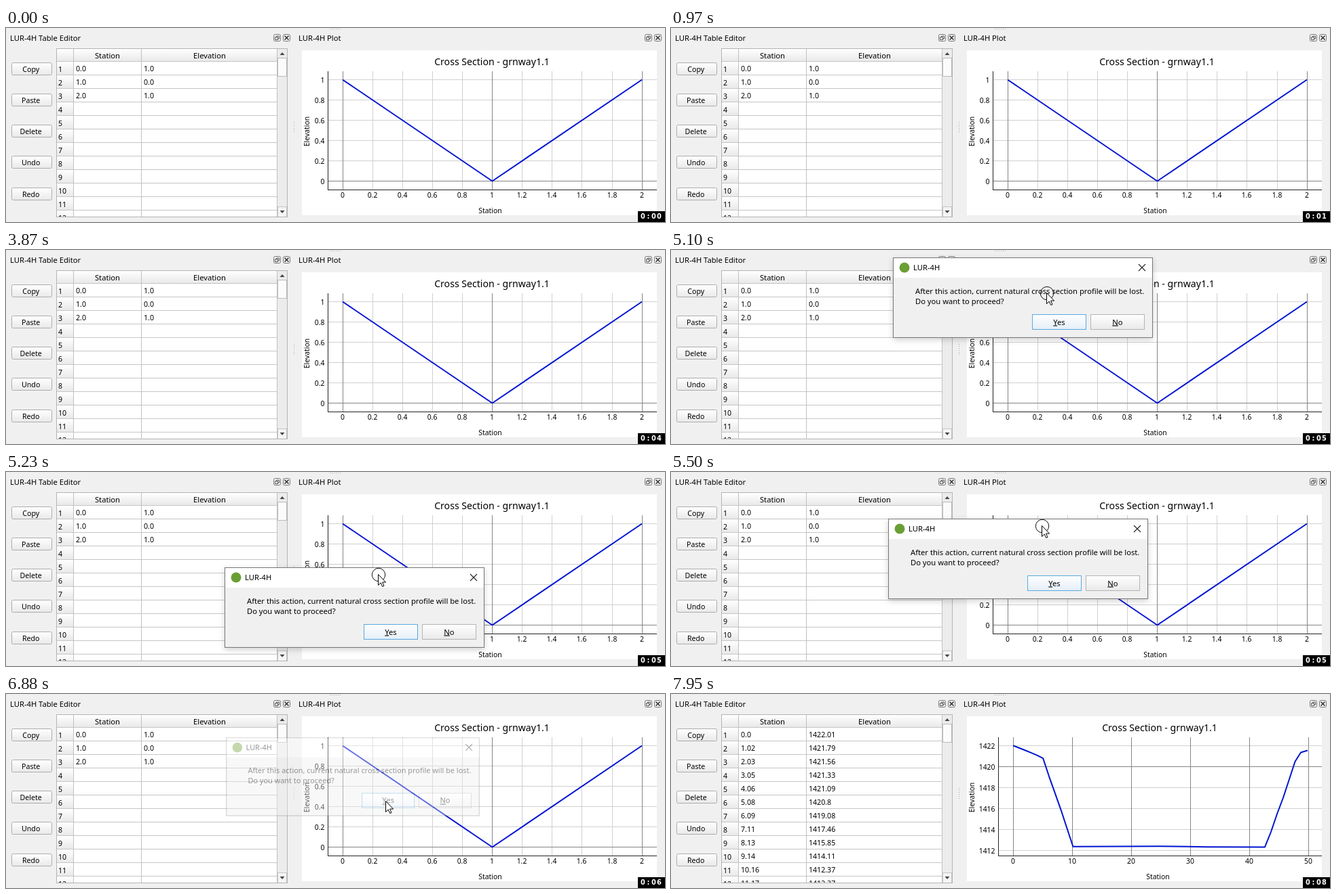
An HTML page that plays this animation: 971 by 287 pixels, repeating every 8 s.

```html
<!DOCTYPE html>
<html lang="en">
<head>
<meta charset="utf-8">
<title>Cross section editor</title>
<style>
  html, body { margin: 0; width: 100%; height: 100%; overflow: hidden; background: #f0f0f0; }
  svg { display: block; }
  text { font-family: "Noto Sans", "Open Sans", sans-serif; font-size: 10.6px; fill: #000; white-space: pre; }
  .ui { font-size: 11.2px; }
  .plot text { font-size: 10.4px; }
  .plot .title { font-size: 14.1px; }
  .clock { font: bold 9.8px "DejaVu Sans", sans-serif; fill: #fff; }
  .crisp { shape-rendering: crispEdges; }
</style>
</head>
<body>
<svg id="stage" width="971" height="287" viewBox="0 0 971 287">
  <defs>
    <linearGradient id="face" x2="0" y2="1">
      <stop offset="0" stop-color="#fff"/><stop offset="1" stop-color="#e9e9e9"/>
    </linearGradient>
    <linearGradient id="focus" x2="0" y2="1">
      <stop offset="0" stop-color="#fff"/><stop offset="1" stop-color="#e4eef8"/>
    </linearGradient>
    <filter id="shadow" x="-10%" y="-20%" width="120%" height="150%">
      <feDropShadow dx="0" dy="3" stdDeviation="4" flood-opacity=".18"/>
    </filter>
    <clipPath id="tableClip"><rect x="75" y="31" width="339" height="248"/></clipPath>
  </defs>
</svg>
<script>
const DURATION = 8000;
const APP = 'LUR-4H';
const stage = document.getElementById('stage');

const rect = (x, y, w, h, fill, stroke = 'none', extra = '') =>
  `<rect x="${x}" y="${y}" width="${w}" height="${h}" fill="${fill}" stroke="${stroke}" ${extra}/>`;
const line = (x1, y1, x2, y2, stroke) =>
  `<path class="crisp" d="M${x1} ${y1}L${x2} ${y2}" stroke="${stroke}"/>`;
const label = (x, y, str, extra = '') => `<text x="${x}" y="${y}" ${extra}>${str}</text>`;
const centered = (x, y, str, extra = '') => label(x, y, str, `text-anchor="middle" ${extra}`);
const group = (content, extra = '') => `<g ${extra}>${content}</g>`;
const range = n => [...Array(n).keys()];

function dockButtons(x) {
  const box = dx => rect(x + dx + .5, 9.5, 10, 10, '#f4f4f4', '#777', 'rx="2"');
  return box(0) + box(14) +
    `<path d="M${x + 4.5} 14V12h4v4h-2M${x + 2.5} 13.5h4v4h-4z" fill="none" stroke="#555"/>` +
    `<path d="M${x + 16.5} 11.5l6 6m0-6l-6 6" stroke="#333" stroke-width="1.6"/>`;
}

function toolButton(name, i) {
  const y = 51 + Math.floor(i * 46.25);
  return rect(8.5, y + .5, 59, 18, 'url(#face)', '#adadad', 'rx="2"') + centered(36.7, y + 14, name);
}

function table(rows) {
  const header = rect(75, 31, 325, 18, 'url(#face)') +
    centered(149.5, 45, 'Station', 'class="ui"') + centered(300, 45, 'Elevation', 'class="ui"');
  const body = range(12).map(i => {
    const y = 49 + 20 * i;
    const [station = '', elevation = ''] = rows[i] || [];
    return rect(75, y + 1, 24, 19, 'url(#face)') + label(77, y + 15.5, i + 1) +
      label(103, y + 15, station) + label(203, y + 15, elevation) +
      line(75, y + .5, 400, y + .5, '#c6c6c6');
  }).join('');
  const columns = [99.5, 199.5, 399.5].map(x => line(x, 31, x, 280, '#c0c0c0')).join('');
  const scroll = rect(400, 31, 14, 248, '#ececec') +
    rect(400.5, 44.5, 13, 27, '#fbfbfb', '#bbb') +
    rect(400.5, 264.5, 13, 15, '#f5f5f5', '#c4c4c4') +
    '<path d="M403.5 40h7l-3.5-4zM403.5 270h7l-3.5 4z" fill="#444"/>';
  return rect(74.5, 30.5, 340, 249, '#fff', '#b4b4b4') +
    group(header + body + columns + scroll, 'clip-path="url(#tableClip)"');
}

// Each tick: { at, text, dark }
function plot({ left, middle, stationX, xTicks, yTicks, curve }) {
  const shade = tick => tick.dark ? '#858585' : '#d0d0d0';
  const byShade = (a, b) => !!a.dark - !!b.dark;
  const grid = [
    ...yTicks.map(t => ({ dark: t.dark, svg: line(left, t.at, 959, t.at, shade(t)) })),
    ...xTicks.map(t => ({ dark: t.dark, svg: line(t.at, 64, t.at, 239, shade(t)) })),
  ].sort(byShade).map(g => g.svg).join('');
  return grid +
    `<path class="crisp" d="M${left} 64V239.5H959" fill="none" stroke="#222"/>` +
    yTicks.map(t => label(left - 5, t.at + 4, t.text, 'text-anchor="end"')).join('') +
    xTicks.map(t => centered(t.at - .5, 250.5, t.text)).join('') +
    centered(middle, 55, 'Cross Section - grnway1.1', 'class="title"') +
    centered(stationX, 274, 'Station') +
    centered(0, 0, 'Elevation', 'transform="translate(447 153) rotate(-90)"') +
    `<polyline points="${curve}" fill="none" stroke="#0014d2" stroke-width="2" stroke-linejoin="round"/>`;
}

const tidy = v => String(+v.toFixed(1));
const before = table([['0.0', '1.0'], ['1.0', '0.0'], ['2.0', '1.0']]) + group(plot({
  left: 474.5, middle: 716, stationX: 713.5,
  xTicks: range(11).map(i => ({ at: Math.floor(496.15 + 44.1 * i) + .5, text: tidy(i / 5), dark: i % 5 === 0 })),
  yTicks: range(6).map(i => ({ at: 226.5 - 30 * i, text: tidy(i / 5), dark: i === 0 })),
  curve: '496,76.5 716.5,226.5 937,76.5',
}), 'class="plot"');

const stations = ['0.0', 1.02, 2.03, 3.05, 4.06, 5.08, 6.09, 7.11, 8.13, 9.14, 10.16, 11.17];
const elevations = [1422.01, 1421.79, 1421.56, 1421.33, 1421.09, 1420.8,
  1419.08, 1417.46, 1415.85, 1414.11, 1412.37, 1412.37];
const bank = stations.slice(0, 11).map((s, i) =>
  `${(504 + 8.7 * s).toFixed(1)},${(76.5 + (1422 - elevations[i]) * 15.5).toFixed(1)}`).join(' ');
const after = table(stations.map((s, i) => [s, elevations[i]])) + group(plot({
  left: 482.5, middle: 720, stationX: 717.5,
  xTicks: range(6).map(i => ({ at: 504.5 + 87 * i, text: i * 10, dark: true })),
  yTicks: range(6).map(i => ({ at: 231.5 - 31 * i, text: 1412 + 2 * i, dark: i === 4 })),
  curve: bank + ' 660,225.5 720,225.2 790,226.2 875,226.4 884,204 893,177.5 902,153.5 911,126 919.5,100 928,86.5 938,83.5',
}), 'class="plot"');

function dialogButton(x, key, rest, fill, stroke, id) {
  return rect(x + .5, 84.5, 79, 22, fill, stroke, `id="${id}"`) +
    centered(x + 40, 99.5, `<tspan text-decoration="underline">${key}</tspan>${rest}`, 'class="ui"');
}

const dialog = rect(.5, .5, 382, 118, '#f0f0f0', '#777', 'id="frame" filter="url(#shadow)"') +
  rect(1, 1, 381, 29, '#fff') +
  '<circle cx="17" cy="15" r="7.5" fill="#6a9f35"/>' +
  label(30, 19, APP, 'class="ui"') +
  '<path d="M362 10l10 10m0-10l-10 10" stroke="#222" stroke-width="1.1"/>' +
  label(33, 54, 'After this action, current natural cross section profile will be lost.', 'class="ui"') +
  label(33, 69, 'Do you want to proceed?', 'class="ui"') +
  dialogButton(205, 'Y', 'es', 'url(#focus)', '#5aa9e0', 'yes') +
  dialogButton(291, 'N', 'o', 'url(#face)', '#b4b4b4', 'no');

const dots = range(6).map(i => rect(424, 139 + 3 * i, 1, 1, '#aaa') + rect(477 + 3 * i, 1, 1, 1, '#aaa')).join('');

stage.insertAdjacentHTML('beforeend',
  rect(0, 0, 971, 287, '#f0f0f0') +
  label(6, 19, `${APP} Table Editor`, 'class="ui"') + label(431, 19, `${APP} Plot`, 'class="ui"') +
  dockButtons(394) + dockButtons(941) + dots +
  ['Copy', 'Paste', 'Delete', 'Undo', 'Redo'].map(toolButton).join('') +
  rect(436, 33, 523, 244, '#fff') +
  group(before, 'id="before"') + group(after, 'id="after"') +
  group(dialog, 'id="dialog"') +
  '<g id="cursor"><circle id="ring" cx="1" cy="1" r="9.7" fill="none" stroke="#111"/>' +
  '<path d="M.5 .5V16.5L4.2 13L6.7 18.5L9 17.5L6.6 12.1H11.6Z" fill="#fff" stroke="#000"/></g>' +
  rect(931, 271, 40, 16, '#000') + '<text id="clock" class="clock" x="935 944.5 951 959" y="282.2"></text>');

const part = Object.fromEntries(['before', 'after', 'dialog', 'frame', 'yes', 'cursor', 'ring', 'clock']
  .map(id => [id, document.getElementById(id)]));

const clockTicks = [970, 1980, 2860, 3870, 4960, 6030, 7000, 7950];
const dialogSteps = [[5100, 327, 11], [5230, 322, 141], [5370, 320, 97], [5500, 320, 69], [5650, 320, 63]];
const cursorSteps = [[5100, 553, 63], [5230, 548, 151], [5370, 546, 107], [5500, 546, 79], [5650, 546, 73],
  [5800, 545, 78], [5910, 543, 108], [6030, 541, 142], [6180, 559, 164], [6320, 559, 158], [7420, 881, 104]];

const stepAt = (steps, t) => steps.filter(s => s[0] <= t).pop();
const show = (el, on) => el.setAttribute('visibility', on ? 'visible' : 'hidden');

function render(t) {
  const updated = t >= 7000;
  part.before.style.display = updated ? 'none' : '';
  part.after.style.display = updated ? '' : 'none';
  part.clock.textContent = '0:0' + clockTicks.filter(c => c <= t).length;

  const box = stepAt(dialogSteps, t);
  const fading = t >= 6880;
  part.dialog.style.display = box && !updated ? '' : 'none';
  if (box) {
    const shrink = fading ? ' translate(191 59) scale(.975) translate(-191.5 -59)' : '';
    part.dialog.setAttribute('transform', `translate(${box[1]} ${box[2]})${shrink}`);
    part.dialog.setAttribute('opacity', fading ? .4 : 1);
    part.frame.setAttribute('filter', fading ? 'none' : 'url(#shadow)');
    part.yes.setAttribute('fill', t >= 6730 && !fading ? '#cce4f7' : 'url(#focus)');
  }

  const tip = stepAt(cursorSteps, t);
  const visible = tip && t < 7570;
  show(part.cursor, visible);
  show(part.ring, visible && t < 5800);
  if (tip) part.cursor.setAttribute('transform', `translate(${tip[1]} ${tip[2]})`);
}

const start = performance.now();
function loop() {
  render((performance.now() - start) % DURATION);
  requestAnimationFrame(loop);
}
loop();
</script>
</body>
</html>
```
